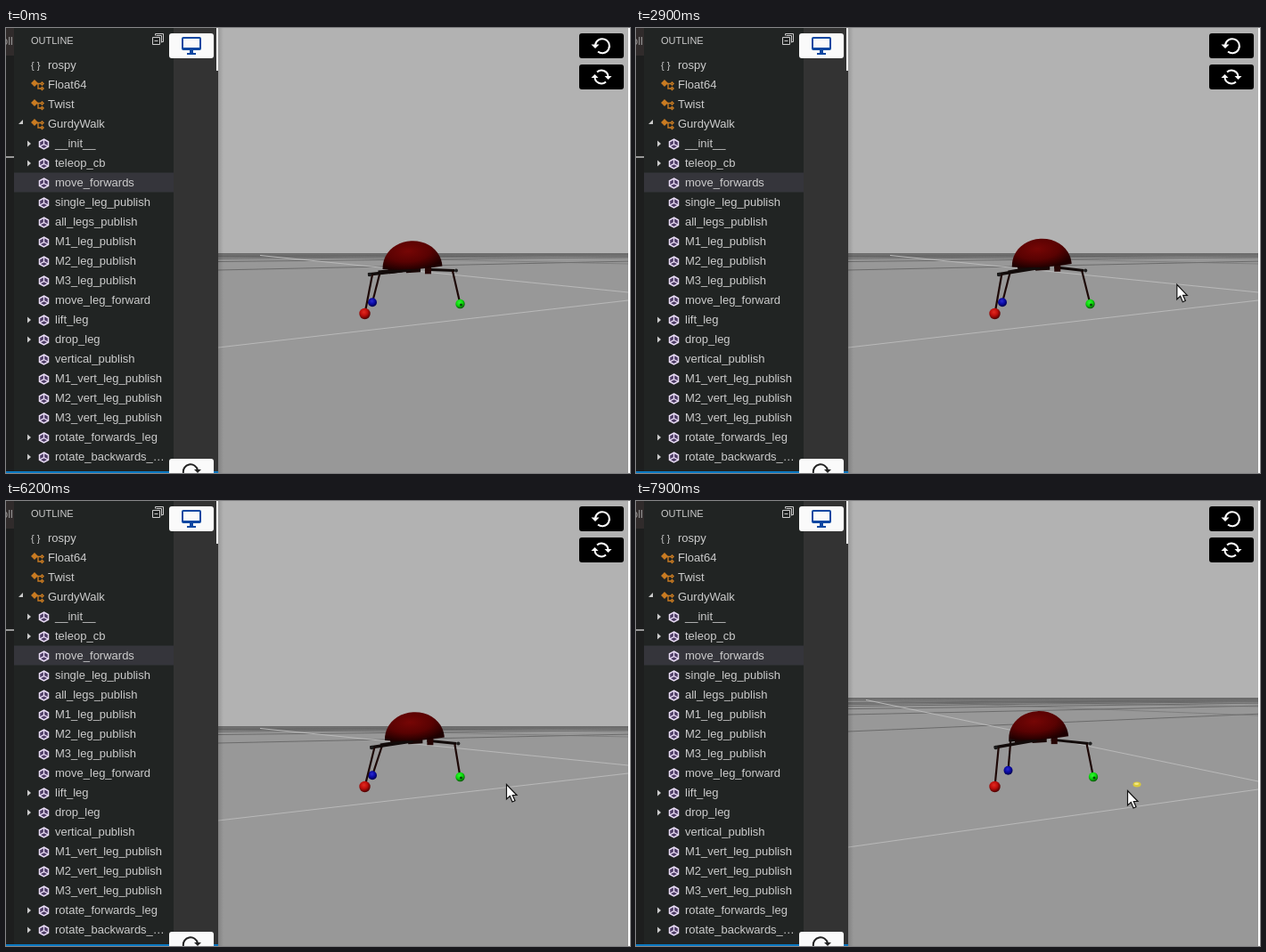
An HTML page that plays this animation: 700 by 500 pixels, repeating every 8000 ms.

```html
<!DOCTYPE html>
<html lang="en">
<head>
<meta charset="utf-8">
<title>Walking robot</title>
<style>
html, body { margin: 0; width: 100%; height: 100%; overflow: hidden; }
svg { display: block; }
text { font: 13px "Liberation Sans", Arial, sans-serif; fill: #ccc; }
</style>
</head>
<body>
<svg width="700" height="500" viewBox="0 0 700 500">
  <defs>
    <linearGradient id="edge"><stop stop-opacity=".15"/><stop offset="1" stop-opacity="0"/></linearGradient>
    <radialGradient id="dome" cx=".44" cy=".35" r=".68"><stop stop-color="#760605"/><stop offset=".55" stop-color="#590202"/><stop offset="1" stop-color="#1e0000"/></radialGradient>
    <radialGradient id="red" cx=".42" cy=".35" r=".65"><stop stop-color="#e32a20"/><stop offset=".5" stop-color="#bd0e0b"/><stop offset="1" stop-color="#4c0000"/></radialGradient>
    <radialGradient id="blue" cx=".45" cy=".35" r=".65"><stop stop-color="#2929d2"/><stop offset=".5" stop-color="#0b0ba5"/><stop offset="1" stop-color="#000045"/></radialGradient>
    <radialGradient id="green" cx=".42" cy=".35" r=".65"><stop stop-color="#35f435"/><stop offset=".55" stop-color="#08d908"/><stop offset="1" stop-color="#005500"/></radialGradient>
    <g id="cube" stroke="#e9dcf5">
      <path d="M0-5.500 5-2.700V2.700L0 5.500-5 2.700V-2.700Z" fill="#4b3a63" stroke-width="1.500"/>
      <path d="M0-5V0L-4.500 2.500M0 0 4.500 2.500" fill="none" stroke-width="1.300"/>
    </g>
    <g id="class" stroke="#c97b22" fill="none" stroke-width="1.400">
      <path d="M-6-2-3-5 0-2-3 1Z" fill="#c97b22"/>
      <path d="M-1-1.500H4M1-1.500V4H4M4-1.500 5.500-3 7-1.500 5.500 0ZM4 4 5.500 2.500 7 4 5.500 5.500Z"/>
    </g>
  </defs>

  <rect width="700" height="500" fill="#b2b2b2"/>
  <g id="scene"></g>
  <rect x="238" width="6" height="500" fill="url(#edge)"/>
  <rect x="698" width="2" height="500" fill="#fff"/>

  <rect width="238" height="500" fill="#333"/>
  <rect width="9" height="500" fill="#1d1e1e"/>
  <rect width="9" height="31" fill="#302b2b"/>
  <text x="-5" y="19" fill-opacity=".65">oll</text>
  <rect y="144" width="9" height="2" fill="#999"/>
  <rect x="9" width="179" height="500" fill="#212423"/>
  <rect x="9" y="162.500" width="179" height="22" fill="#35353b"/>
  <text x="28" y="18" style="font-size:11px">OUTLINE</text>
  <path d="M167.500 8.500V6.500H176.500V15.500H174.500M164.500 10.500H172.500V18.500H164.500ZM166.500 14.500H170.500M168.500 8.500H174.500V16.500" fill="none" stroke="#ccc"/>
  <g id="outline"></g>
  <rect y="498" width="238" height="2" fill="#0a78c2"/>
  <rect x="236" width="2" height="48" fill="#fff"/>

  <g fill="#fafafa">
    <rect x="183" y="6" width="50" height="28" rx="3"/>
    <rect x="183" y="484" width="50" height="28" rx="3"/>
  </g>
  <rect x="643" y="6" width="50" height="28" rx="3"/>
  <rect x="643" y="41" width="50" height="28" rx="3"/>
  <path d="M199 10H217Q219 10 219 12V23Q219 25 217 25H210V28H213V30H203V28H206V25H199Q197 25 197 23V12Q197 10 199 10ZM199 12V22H217V12Z" fill="#0c47a1" fill-rule="evenodd"/>
  <g fill="none" stroke-width="2">
    <path d="M199 500A8 8 0 0 1 215 497" stroke="#222"/><path d="M211 496H219L215 500Z" fill="#222"/>
    <path d="M661 19A8 8 0 1 1 664 26.500" stroke="#fff"/><path d="M656.500 18.500H665.500L661 23Z" fill="#fff"/>
  </g>
  <g transform="translate(668 55)" fill="none" stroke="#fff" stroke-width="2">
    <path d="M5 5.500A7.500 7.500 0 0 1-7.500 0M-5-5.500A7.500 7.500 0 0 1 7.500 0"/>
    <path d="M-11.500 1-7.500-3-3.500 1ZM11.500-1 7.500 3 3.500-1Z" fill="#fff" stroke="none"/>
  </g>
  <g id="pointer"></g>
</svg>

<script>
const LOOP = 8000, STEP = 100;
const $ = id => document.getElementById(id);

// Outline rows: ">" marks a collapsed method.
const rows = `rospy Float64 Twist GurdyWalk >__init__ >teleop_cb move_forwards single_leg_publish
  all_legs_publish M1_leg_publish M2_leg_publish M3_leg_publish move_leg_forward >lift_leg >drop_leg
  vertical_publish M1_vert_leg_publish M2_vert_leg_publish M3_vert_leg_publish
  >rotate_forwards_leg >rotate_backwards_…`.split(/\s+/);

$('outline').innerHTML = rows.map((row, i) => {
  const y = 42 + 22 * i, method = i > 3;
  const icon = method ? `<use href="#cube" x="42.5" y="${y + .5}"/>`
    : i ? `<use href="#class" x="35" y="${y}"/>`
    : `<text x="28" y="46" style="font-size:11px">{ }</text>`;
  const arrow = row[0] === '>' ? `<path d="M24 ${y - 3.5}l4 3.5-4 3.5z" fill="#ccc"/>`
    : i === 3 ? `<path d="M19 ${y - 5}v5h-5z" fill="#ccc"/>` : '';
  return `${arrow}${icon}<text x="${method ? 55 : 47}" y="${y + 4}">${row.replace('>', '')}</text>`;
}).join('');

const clamp = u => Math.min(1, Math.max(0, u));
const smooth = u => u * u * (3 - 2 * u);
const easeOut = u => u * (2 - u);
const bump = (t, center, width) => smooth(clamp(1 - Math.abs(t - center) / width));

const line = (x1, y1, x2, y2, color, width = 1) =>
  `<path d="M${x1} ${y1}L${x2} ${y2}" stroke="${color}" stroke-width="${width}"/>`;
const ball = ([x, y], r, color) => `<circle cx="${x}" cy="${y}" r="${r}" fill="url(#${color})"/>`;

// The camera tilts down from 6.7 s on; grid lines crowd towards the horizon as 1/n.
function ground(t) {
  const tilt = clamp((t - 6700) / 1200) ** 1.3, h = 253 - 32 * tilt;
  const mix = (a, b) => a + (b - a) * tilt;
  let grid = '';
  for (let n = 1; n < 8; n++) {
    const left = mix(19, 38) / n;
    grid += line(238, h + left, 698, h + left * .48, '#666', .9) +
      line(238, h + 2, 698, h + mix(12, 20) / n, '#757575', .7);
  }
  return `<rect x="238" y="${h}" width="460" height="${500 - h}" fill="#989898"/>
    <rect x="238" y="${h}" width="460" height="3.5" fill="#6a6a6a"/>` + grid +
    line(mix(285, 258), h + 2.5, 698, mix(297, 315), '#b9b9b9') +
    line(238, mix(359, 389), 698, mix(306, 324), '#b9b9b9');
}

// The body sways over nearly still feet; knees follow the body plus a swing of their own.
function pose(t) {
  const sway = Math.cos((t - 3700) / 2975 * 2 * Math.PI);
  const stride = bump(t, 4800, 1300), reach = bump(t, 7900, 1000);
  const x = 455.8 + 4.8 * sway;
  const blueSwing = 3 * bump(t, 2100, 1200) - 9 * bump(t, 4500, 1500) - 5 * bump(t, 7000, 800) + 5 * reach;
  return {
    x, top: 237.3 + .8 * sway + 2.5 * bump(t, 0, 900),
    red: { knee: [x - 45 + 10 * stride, 277], foot: [402.5 + 5 * stride, 321] },
    blue: { knee: [x - 36.5 + blueSwing, 275 - 3 * stride - 5 * reach], foot: [411 - 6 * stride + 6.5 * reach, 308.3 + stride - 5.5 * reach] },
    green: { knee: [x + 45 + 10 * stride + 13 * bump(t, 7450, 1200), 273], foot: [509.5 + 3.5 * bump(t, 7900, 1300), 310 + 2 * stride] }
  };
}

function robot({ x, top, red, blue, green }) {
  const base = top + 29.5, dark = '#120b0a';
  const leg = ({ knee, foot }, r, color) => line(...knee, ...foot, '#1d0806', 2.2) + ball(foot, r, color);
  const [rx, ry] = red.knee, [bx, by] = blue.knee, [gx, gy] = green.knee, [fx, fy] = green.foot;
  return leg(blue, 5, 'blue') + line(bx - 2, by - 1, x, base + 1, dark, 3) +
    line(x + 14, base + 2, gx + 2, gy - .5, dark, 3) + leg(green, 5.2, 'green') +
    `<circle cx="${fx + 1}" cy="${fy + 1}" r="1.5" fill="#064806"/>
    <circle cx="${gx + 4}" cy="${gy - .5}" r="2" fill="#222"/>
    <path d="M${x - 28} ${base}h17v5l-15 2zM${x - 9} ${base - 1}h18v6l-16 1z" fill="#180605"/>
    <rect x="${x + 14}" y="${base - 3}" width="7" height="10" fill="#250504"/>` +
    line(rx - 5, ry, x - 2, base + 2.5, dark, 3.5) + leg(red, 6.2, 'red') +
    `<circle cx="${rx - 3}" cy="${ry}" r="2.2" fill="#1b1b1b"/>
    <path d="M-33.5 0C-33-18-18-30 0-30S33-18 33.5 0Q0 4-33.5 0Z" fill="url(#dome)"
      transform="translate(${x} ${base}) rotate(-3)"/>`;
}

// Time, x, y of the pointer's stops.
const stops = [
  [700, 546, 510], [1800, 624, 374], [2100, 632, 350], [2700, 607, 288],
  [4400, 604, 287], [5300, 561, 318], [6700, 561, 318], [7900, 551, 325]
];
function pointer(t) {
  const i = stops.findIndex(stop => stop[0] >= t);
  if (i < 1) return '';
  const [t0, x0, y0] = stops[i - 1], [t1, x1, y1] = stops[i];
  const u = easeOut((t - t0) / (t1 - t0));
  return `<path d="M0 0V16.5L3.8 13 6.5 19.5 9.5 18.2 6.8 12H11.5Z" fill="#fff" stroke="#111" stroke-width="1.2"
    transform="translate(${x0 + (x1 - x0) * u + .5} ${y0 + (y1 - y0) * u + .5})"/>`;
}

const marker = `<ellipse cx="562" cy="318.5" rx="4.5" ry="3" fill="#d9c93c"/>
  <ellipse cx="561.5" cy="317.7" rx="2.5" ry="1.3" fill="#f3e986"/>`;

function draw(now) {
  const t = Math.floor(now % LOOP / STEP) * STEP;
  $('scene').innerHTML = ground(t) + robot(pose(t)) + (t < 6800 ? '' : marker);
  $('pointer').innerHTML = pointer(t);
  requestAnimationFrame(draw);
}
requestAnimationFrame(draw);
</script>
</body>
</html>
```
